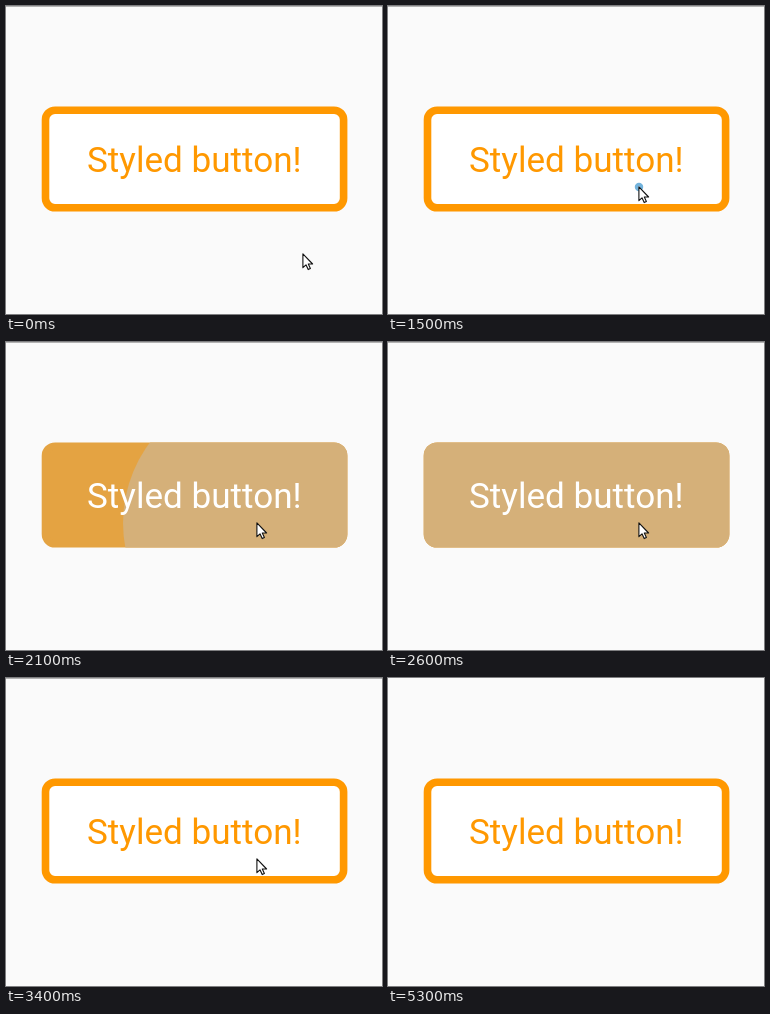
Write an HTML page that moves like this. It is 376 px wide and 308 px high and loops after 5400 ms.

```html
<!DOCTYPE html>
<html lang="en">
<head>
<meta charset="utf-8">
<title>Styled button</title>
<style>
  html, body { margin: 0; width: 100%; height: 100%; overflow: hidden; background: #fafafa; }
  svg { display: block; width: 376px; height: 308px; }
  text { font: 400 35.1px Roboto, "Open Sans", sans-serif; text-anchor: middle; }
</style>
</head>
<body>
<svg viewBox="0 0 376 308">
  <clipPath id="shape"><rect x="35.7" y="100.4" width="305.7" height="105.2" rx="13.3"/></clipPath>
  <rect id="topLine" width="376" height="1" fill="#b2b2b2"/>
  <rect id="button" x="39.5" y="104.2" width="298.1" height="97.6" rx="9.5" stroke-width="7.6"/>
  <circle id="ripple" cx="251" cy="181" fill="#d5b079" clip-path="url(#shape)"/>
  <text id="label" x="188.3" y="166">Styled button!</text>
  <circle id="ring" cx="251" cy="181" fill="none" stroke="#68add9" opacity=".93"/>
  <path id="cursor" d="M.5.5V14.3L3.6 11.4L5.8 16.2L8 15.2L5.9 10.6H10.2Z"
        fill="#fff" stroke="#111" stroke-width="1.1" stroke-linejoin="round"/>
</svg>
<script>
const LOOP = 5400, STEP = 100;
const PRESS = 1480, RELEASE = 3100;
const RING_SIZE = 17, RING_LIFE = 260, RIPPLE_SPEED = .2375;
const WHITE = [255, 255, 255], ORANGE = [255, 152, 0], PRESSED = [228, 163, 66];
const [topLine, button, ripple, label, ring, cursor] =
  ["topLine", "button", "ripple", "label", "ring", "cursor"].map(id => document.getElementById(id));

// Progress from 0 to 1 over a span of time
const ramp = (t, from, length) => Math.min(1, Math.max(0, (t - from) / length));
const smooth = k => k * k * (3 - 2 * k);
const mix = (a, b, k) => `rgb(${a.map((v, i) => Math.round(v + (b[i] - v) * k))})`;

function set(node, attrs) {
  for (const name in attrs) node.setAttribute(name, attrs[name]);
}

// A click mark grows as a disc while its hole catches up
function drawRing(age) {
  const outer = RING_SIZE * (1 - (1 - ramp(age, 0, 150)) ** 2);
  const hole = RING_SIZE * ramp(age, 0, RING_LIFE) ** 1.2;
  const width = Math.max(0, outer - hole);
  set(ring, {
    r: (outer + hole) / 2,
    "stroke-width": width,
    visibility: width > 0 ? "visible" : "hidden"
  });
}

function draw(t) {
  const pressing = ramp(t, PRESS + 20, 200);
  const released = ramp(t, RELEASE, 300);
  const held = t > RELEASE ? 0 : pressing;

  set(button, { fill: mix(WHITE, PRESSED, held), stroke: mix(ORANGE, PRESSED, held) });
  set(label, { fill: mix(ORANGE, WHITE, pressing * (1 - released) ** 2) });
  set(ripple, {
    r: Math.max(0, t - PRESS - 56) * RIPPLE_SPEED,
    opacity: ramp(t, PRESS - 180, 700) * (1 - released)
  });
  drawRing(t - (t < RELEASE ? PRESS : RELEASE));

  const k = smooth(ramp(t, 800, 600));
  const visible = 1 - ramp(t, 5100, 200);
  set(cursor, {
    transform: `translate(${296.4 - 46 * k} ${247.4 - 67 * k})`,
    opacity: visible
  });
  set(topLine, { opacity: visible });
}

const start = performance.now();
function tick() {
  const t = (performance.now() - start) % LOOP;
  draw(Math.floor(t / STEP) * STEP);
  requestAnimationFrame(tick);
}
tick();
</script>
</body>
</html>
```
